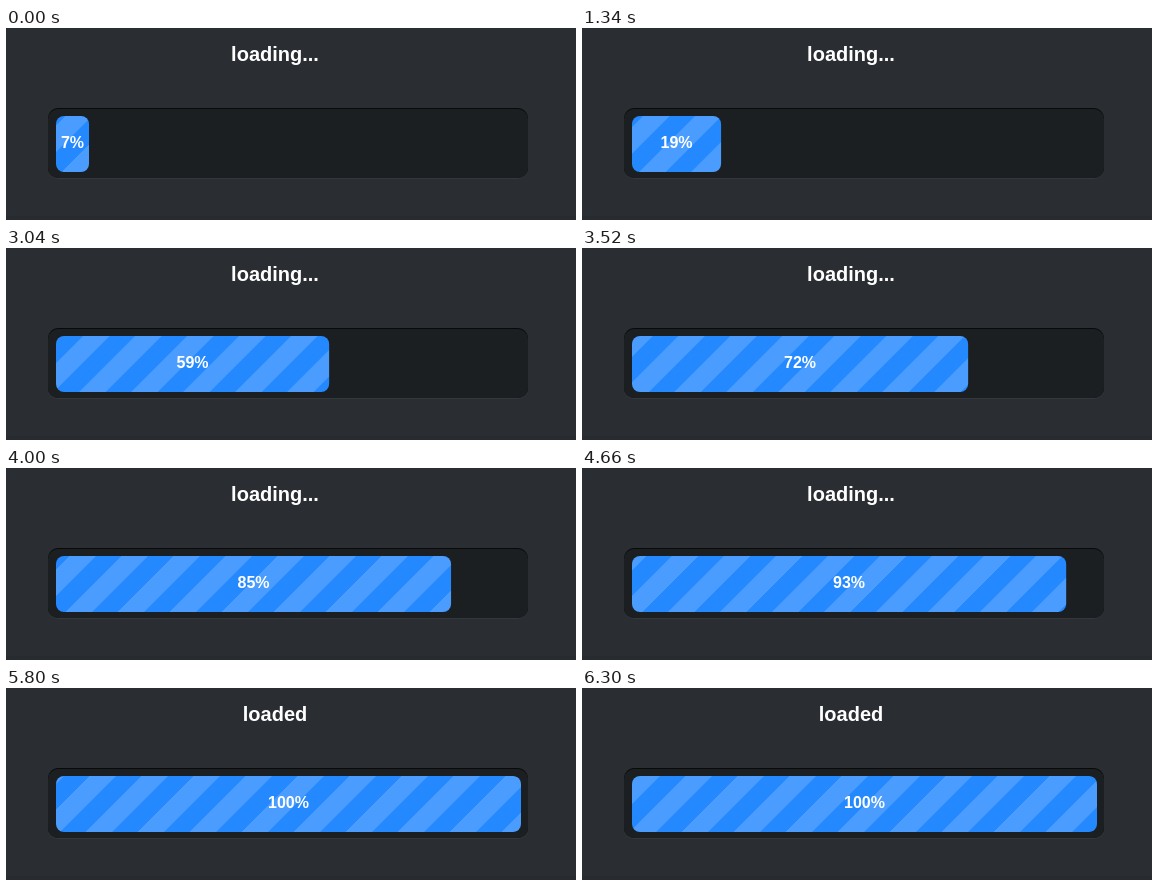
An HTML page that plays this animation: 570x192 px, repeating every 6320 ms.

```html
<!DOCTYPE html>
<html>
<head>
<meta charset="utf-8">
<style>
html, body { margin: 0; width: 100%; height: 100%; overflow: hidden; background: #2a2d32; }
svg { display: block; }
text { font: bold 16px "Liberation Sans", Arial, sans-serif; fill: #fff; text-anchor: middle; }
#title { font-size: 20px; }
</style>
</head>
<body>
<svg width="570" height="192" viewBox="0 0 570 192">
  <defs>
    <linearGradient id="stripes" gradientUnits="userSpaceOnUse" x1="0" y1="0" x2="26" y2="26" spreadMethod="repeat">
      <stop offset="0" stop-color="#4a9dff"/>
      <stop offset=".49" stop-color="#4a9dff"/>
      <stop offset=".51" stop-color="#2489ff"/>
      <stop offset=".98" stop-color="#2489ff"/>
      <stop offset="1" stop-color="#4a9dff"/>
    </linearGradient>
  </defs>
  <rect width="570" height="192" fill="#2a2d32"/>
  <rect y="188" width="570" height="4" fill="#272a2e"/>
  <rect x="42" y="81" width="480" height="70" rx="10" fill="#34373b"/>
  <rect x="42" y="80" width="480" height="70" rx="10" fill="#080909"/>
  <rect x="42" y="81" width="480" height="69" rx="10" fill="#1b1f21"/>
  <rect id="bar" x="50" y="88" height="56" rx="8" fill="url(#stripes)"/>
  <text id="title" x="269" y="33"></text>
  <text id="label" y="120"></text>
</svg>
<script>
const LOOP = 6320, FULL = 465, DONE = 5450;
const [bar, title, label, stripes] =
  ["bar", "title", "label", "stripes"].map(id => document.getElementById(id));

// [time in ms, bar width in px]
const progress = [
  [0, 33], [640, 43], [1280, 87], [1340, 89], [1920, 141], [2220, 183],
  [2560, 227], [3040, 273], [3200, 295], [3840, 377], [4000, 395],
  [4480, 424], [5120, 460], [5300, 464], [DONE, FULL], [LOOP, FULL]
];

function widthAt(t) {
  const i = progress.findIndex(p => p[0] > t);
  const [t0, w0] = progress[i - 1], [t1, w1] = progress[i];
  return w0 + (w1 - w0) * (t - t0) / (t1 - t0);
}

function draw() {
  const t = performance.now() % LOOP;
  const w = widthAt(t);
  bar.setAttribute("width", w);
  stripes.setAttribute("gradientTransform", `translate(${148 + t * 0.04} 0)`);
  label.setAttribute("x", 50 + w / 2);
  label.textContent = Math.round(w / FULL * 100) + "%";
  title.textContent = t < DONE ? "loading..." : "loaded";
  requestAnimationFrame(draw);
}
draw();
</script>
</body>
</html>
```
